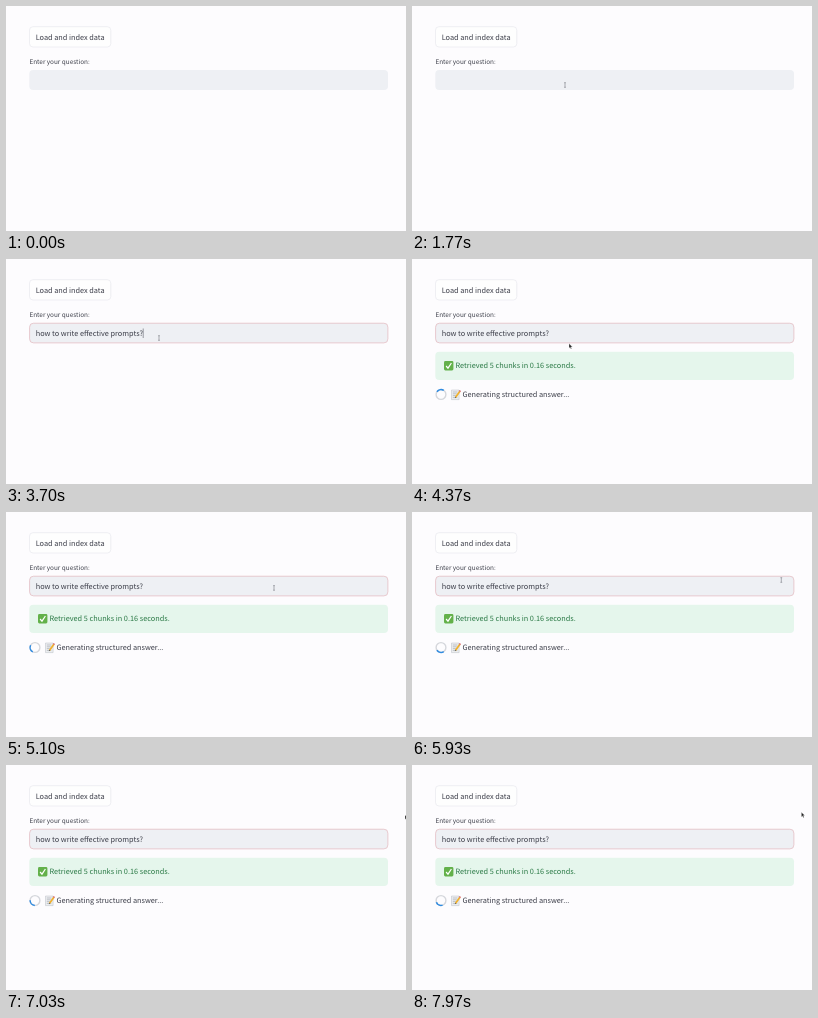
Write an HTML page that moves like this. It is 400 px wide and 225 px high and loops after 8 s.

```html
<!DOCTYPE html>
<html lang="en">
<head>
<meta charset="utf-8">
<title>Question form</title>
<style>
  html, body { margin: 0; width: 100%; height: 100%; overflow: hidden; background: #fdfcfe; }
  svg { display: block; width: 100vw; height: 100vh; }
  text {
    font: 7.33px "Noto Sans CJK SC", "Noto Sans CJK JP", "Noto Sans CJK", "Noto Sans", sans-serif;
    fill: #3c3e49;
    text-rendering: geometricPrecision;
  }
</style>
</head>
<body>
<svg viewBox="0 0 400 225">
  <rect x="23.5" y="20.7" width="81.3" height="20.3" rx="3.5" fill="#fefefe" stroke="#e9e9ee" stroke-width=".7"/>
  <text x="29.7" y="33.9">Load and index data</text>
  <text x="23.4" y="58.1" style="font-size:6.4px">Enter your question:</text>

  <rect x="23.3" y="64" width="358.7" height="20.1" rx="4" fill="#eef0f4"/>
  <rect id="focus" x="23.6" y="64.2" width="358.3" height="19.7" rx="4" fill="none" stroke="#e6bdc2" stroke-width=".75"/>
  <text id="question" x="29.7" y="76.6">how to write effective prompts?</text>
  <path id="caret" d="M0 69.5v9.5" stroke="#5a5c66" stroke-width=".6"/>

  <g id="result">
    <rect x="23.3" y="92.8" width="358.7" height="28.2" rx="4" fill="#e5f6ec"/>
    <rect x="32" y="102" width="9.4" height="9.4" rx="1.4" fill="#63b14a"/>
    <path d="M34.1 107l1.9 2.2 3.4-5.2" fill="none" stroke="#fff" stroke-width="1.2"/>
    <text x="43.5" y="109.2" style="fill:#2b7a46">Retrieved 5 chunks in 0.16 seconds.</text>

    <circle cx="29" cy="135.5" r="4.9" fill="none" stroke="#d5d7dc" stroke-width="1.4"/>
    <path id="spinner" d="M25.54 132.04a4.9 4.9 0 0 1 6.92 0" fill="none" stroke="#2f8be0" stroke-width="1.5"/>
    <path d="M39.5 131h7.6v9.6h-7.6z" fill="#eceef0" stroke="#b9bdc4" stroke-width=".5"/>
    <path d="M40.8 133h4.6m-4.6 1.8h4m-4 1.8h3m-3 1.8h4.5" stroke="#8d939c" stroke-width=".5"/>
    <path d="M43.6 138.2l4.3-6" stroke="#f0b02c" stroke-width="1.7"/>
    <path d="M47.6 132.6l.7-1" stroke="#d96570" stroke-width="1.7"/>
    <path d="M42.9 139.2l.1-1.5 1.2.9z" fill="#55504a"/>
    <text x="50.4" y="138.3">Generating structured answer...</text>
  </g>

  <path id="arrow" d="M0 0v4.6l1.1-1 .8 1.8.8-.4-.8-1.7h1.5z" fill="#222" stroke="#fff" stroke-width=".3"/>
  <path id="beam" d="M-.9-2.3h1.8m-.9 0v4.6m-.9 0h1.8" fill="none" stroke="#777a82" stroke-width=".6"/>
</svg>
<script>
const LOOP = 8000;
const $ = id => document.getElementById(id);
const clamp = v => Math.min(1, Math.max(0, v));
const ease = v => v * v * (3 - 2 * v);
const show = (id, opacity) => $(id).setAttribute("opacity", opacity);
const move = (id, x, y) => $(id).setAttribute("transform", `translate(${x} ${y})`);

// Pointer stops: time, x, y
const stops = [
  [1270, 239, 2], [1590, 154, 85], [1740, 153, 79], [3950, 153, 79],
  [4300, 157, 84.6], [4730, 157, 84.6], [5450, 369.3, 68],
  [6400, 369.3, 68], [6950, 399, 50], [7230, 399, 50], [7850, 389.4, 47.3]
];

function pointer(t) {
  const next = stops.findIndex(s => s[0] > t);
  if (next === 0) return [-20, -20];
  if (next < 0) return stops.at(-1).slice(1);
  const [t0, x0, y0] = stops[next - 1], [t1, x1, y1] = stops[next];
  const k = ease((t - t0) / (t1 - t0));
  return [x0 + (x1 - x0) * k, y0 + (y1 - y0) * k];
}

const textEnd = 29.9 + $("question").getComputedTextLength();

function draw(t) {
  const pasted = t >= 3300;
  show("focus", clamp((t - 2030) / 200));
  show("question", +pasted);
  show("caret", +((t >= 2030 && t < 2600) || (pasted && t < 3900)));
  move("caret", pasted ? textEnd : 30, 0);
  show("result", clamp((t - 4080) / 150));
  $("spinner").setAttribute("transform", `rotate(${(t - 4400) * 0.36} 29 135.5)`);

  const [x, y] = pointer(t);
  const overInput = x < 382 && y > 64 && y < 84;
  move("arrow", x, y);
  move("beam", x, y);
  show("arrow", +!overInput);
  show("beam", +overInput);
}

const start = performance.now();
function tick() {
  draw((performance.now() - start) % LOOP);
  requestAnimationFrame(tick);
}
tick();
</script>
</body>
</html>
```
